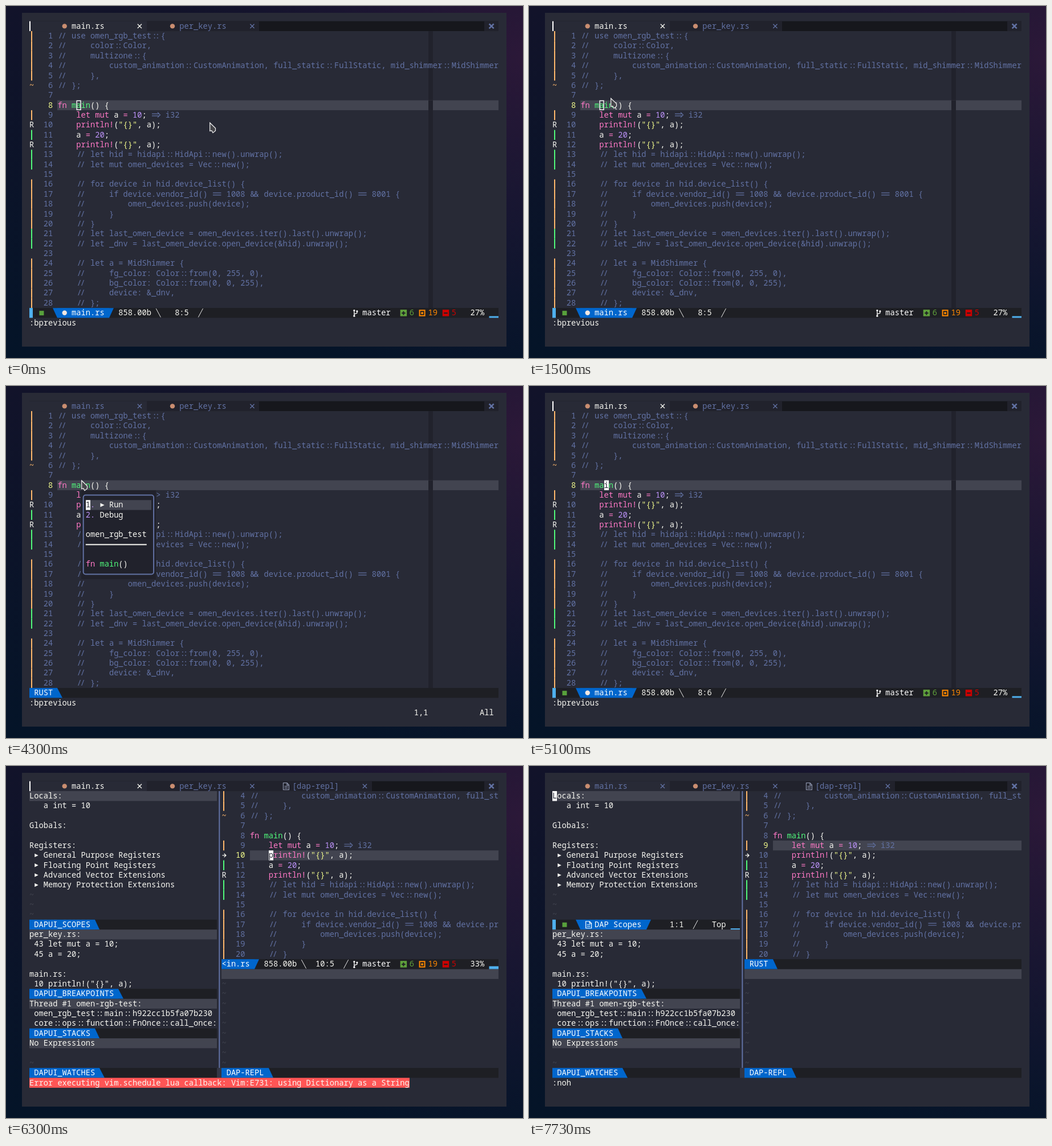
An HTML page with a canvas for the animation above (8 s loop, 907 px wide and 618 px high).

```html
<!DOCTYPE html>
<html lang="en">
<head>
<meta charset="utf-8">
<title>Editor debugging session</title>
<style>
html, body { margin: 0; width: 100%; height: 100%; overflow: hidden; background: #061226; }
canvas { display: block; width: 907px; height: 618px; }
</style>
</head>
<body>
<canvas id="stage" width="907" height="618"></canvas>
<script>
const ctx = document.getElementById('stage').getContext('2d');
const LOOP = 8000, CW = 8.23, CH = 17.36, X0 = 41, Y0 = 26.7;
const BG = '#282a36', DARK = '#21222c', BAR = '#1e1f24', LINE = '#424450', FG = '#f8f8f2',
  BLUE = '#6272a4', PINK = '#ff79c6', GREEN = '#50fa7b', PURPLE = '#bd93f9',
  YELLOW = '#f1fa8c', ORANGE = '#ffb86c', MODE = '#0066cc', SKY = '#4fb0ee', RUST = '#c98d70';

const CODE = `// use omen_rgb_test::{
//     color::Color,
//     multizone::{
//         custom_animation::CustomAnimation, full_static::FullStatic, mid_shimmer::MidShimmer
//     },
// };

fn main() {
    let mut a = 10; => i32
    println!("{}", a);
    a = 20;
    println!("{}", a);
    // let hid = hidapi::HidApi::new().unwrap();
    // let mut omen_devices = Vec::new();

    // for device in hid.device_list() {
    //     if device.vendor_id() == 1008 && device.product_id() == 8001 {
    //         omen_devices.push(device);
    //     }
    // }
    // let last_omen_device = omen_devices.iter().last().unwrap();
    // let _dnv = last_omen_device.open_device(&hid).unwrap();

    // let a = MidShimmer {
    //     fg_color: Color::from(0, 255, 0),
    //     bg_color: Color::from(0, 0, 255),
    //     device: &_dnv,
    // };`.split('\n');
// One sign per line: o/g = orange/green bar
const SIGNS = 'ooooo~  oRgRgg ooooogg ooooo';
const SCOPES = ['Locals:', '   a int = 10', '', 'Globals:', '', 'Registers:',
  '   General Purpose Registers', '   Floating Point Registers',
  '   Advanced Vector Extensions', '   Memory Protection Extensions'];
const BREAKS = ['per_key.rs:', ' 43 let mut a = 10;', ' 45 a = 20;', '', 'main.rs:', ' 10 println!("{}", a);'];
const STACKS = ['Thread #1 omen-rgb-test:', ' omen_rgb_test::main::h922cc1b5fa07b230',
  ' core::ops::function::FnOnce::call_once:'];
const ERROR = 'Error executing vim.schedule lua callback: Vim:E731: using Dictionary as a String';
const NUDGE = { '//': 1.1, '::': 1.5, '&&': 0.8 };

const cx = c => X0 + c * CW, cy = r => Y0 + r * CH;

function rect(x, y, w, h, color) {
  ctx.fillStyle = color;
  ctx.fillRect(x, y, w, h);
}
function cells(c, r, w, h, color) {
  const x = Math.round(cx(c));
  rect(x, cy(r), Math.round(cx(c + w)) - x, h * CH, color);
}
function poly(points, color) {
  ctx.beginPath();
  points.forEach(([x, y]) => ctx.lineTo(x, y));
  ctx.closePath();
  ctx.fillStyle = color;
  ctx.fill();
}
function stroke(color, width, ...paths) {
  ctx.strokeStyle = color;
  ctx.lineWidth = width;
  ctx.beginPath();
  for (const p of paths) p.forEach(([x, y], i) => i ? ctx.lineTo(x, y) : ctx.moveTo(x, y));
  ctx.stroke();
}
function dot(x, y, r, color) {
  ctx.beginPath();
  ctx.arc(x, y, r, 0, 7);
  ctx.fillStyle = color;
  ctx.fill();
}

// Grid text with coding ligatures
function put(c, r, text, color = FG) {
  const base = cy(r) + 13;
  ctx.fillStyle = color;
  for (let i = 0; i < text.length && c + i < 100; i++) {
    const x = cx(c + i), pair = text.substr(i, 2), n = NUDGE[pair];
    if (n) {
      ctx.fillText(pair[0], x + n, base);
      if (c + i < 99) ctx.fillText(pair[1], x + CW - n, base);
      i++;
    } else if (pair === '==' || pair === '=>') {
      const end = x + 2 * CW - (pair === '=>' ? 3.2 : 1), tip = x + 2 * CW - 1, m = base - 4.8;
      stroke(color, 1.2, [[x + 1, m - 1.8], [end, m - 1.8]], [[x + 1, m + 1.8], [end, m + 1.8]]);
      if (pair === '=>') stroke(color, 1.2, [[tip - 4.5, m - 4.5], [tip, m], [tip - 4.5, m + 4.5]]);
      i++;
    } else if (text[i] !== ' ') ctx.fillText(text[i], x, base);
  }
}

function putCode(c, r, line) {
  const re = /\/\/.*|=> i32|"[^"]*"|println!|\b(?:fn|let|mut)\b|\bmain\b|\d+|=|[^\s]/g;
  for (const m of line.matchAll(re)) {
    const s = m[0];
    const color = /^(\/\/|=>)/.test(s) ? BLUE : s[0] === '"' ? YELLOW
      : /^(fn|let|mut|println!|=)$/.test(s) ? PINK : s === 'main' ? GREEN : /^\d/.test(s) ? PURPLE : FG;
    put(c + m.index, r, s, color);
  }
}

function triangle(c, r, kind, color) {
  const l = Math.round(cx(c)), e = Math.round(cx(c + 1)), t = cy(r), b = cy(r + 1);
  const corners = { upLeft: [[l, t], [e, t], [l, b]], upRight: [[l, t], [e, t], [e, b]], lowLeft: [[l, t], [e, b], [l, b]] };
  poly(corners[kind], color);
}
function slash(c, r, forward) {
  const a = cy(r) + 1, b = cy(r + 1) - 1;
  stroke('#e8e8e8', 1, [[cx(c), forward ? b : a], [cx(c + 1), forward ? a : b]]);
}
function cross(c, color) {
  const x = cx(c + 0.5), y = cy(0.5), s = 3.6;
  stroke(color, 1.3, [[x - s, y - s], [x + s, y + s]], [[x + s, y - s], [x - s, y + s]]);
}
function fileIcon(c, r, color) {
  const x = cx(c) + 1, y = cy(r) + 3;
  stroke(color, 1.2, [[x, y], [x + 6.5, y], [x + 10, y + 3.5], [x + 10, y + 12], [x, y + 12], [x, y - 0.5]],
    [[x + 6.5, y], [x + 6.5, y + 4], [x + 10, y + 4]],
    [[x + 2, y + 6], [x + 8, y + 6]], [[x + 2, y + 9], [x + 8, y + 9]]);
}

function drawTabs(active, repl) {
  cells(0, 0, 100, 1, '#16171c');
  cells(0, 0, 25, 1, BG);
  cells(25, 0, 24, 1, DARK);
  cells(97, 0, 3, 1, DARK);
  if (active) cells(0, 0, 0.26, 1, '#fff');
  const fg = active ? FG : BLUE;
  dot(cx(7.5), cy(0.5), 4.2, RUST);
  put(9, 0, 'main.rs', fg);
  cross(23, fg);
  dot(cx(30.5), cy(0.5), 4.2, RUST);
  put(32, 0, 'per_key.rs', BLUE);
  cross(47, BLUE);
  if (repl) {
    cells(49, 0, 24, 1, DARK);
    fileIcon(54, 0, '#8a91a8');
    put(56, 0, '[dap-repl]', BLUE);
    cross(71, BLUE);
  }
  const x = cx(98.5), y = cy(0.5);
  stroke(BLUE, 2.6, [[x - 4, y - 4], [x + 4, y + 4]], [[x + 4, y - 4], [x - 4, y + 4]]);
}

// Lines from `first` on, in the window starting at column c
function drawCode(c, first, rows, cur, arrow) {
  if (c === 0) cells(85, 1, 1, rows, DARK);
  for (let i = 0; i < rows; i++) {
    const n = first + i, r = i + 1, sign = SIGNS[n - 1];
    if (n === cur) {
      cells(c + 6, r, 94 - c, 1, LINE);
      if (c === 0) cells(85, r, 1, 1, DARK);
    }
    if (arrow && n === 10) {
      const x = cx(c) + 1, y = cy(r + 0.5);
      stroke(FG, 1.3, [[x, y], [x + 6.5, y]], [[x + 3.2, y - 3.2], [x + 6.5, y], [x + 3.2, y + 3.2]]);
    } else if (sign === 'o' || sign === 'g') {
      rect(Math.floor(cx(c + 0.5)) - 1, cy(r), 2, CH, sign === 'o' ? ORANGE : GREEN);
    } else put(c, r, sign, sign === '~' ? ORANGE : FG);
    put(c + 3, r, String(n).padStart(2), n === cur ? YELLOW : BLUE);
    putCode(c + 6, r, CODE[n - 1]);
  }
}

function block(c, r, char) {
  cells(c, r, 1, 1, '#fff');
  put(c, r, char, BG);
}

function label(c, r, w, text) {
  cells(c, r, w, 1, BAR);
  cells(c, r, text.length + 2, 1, MODE);
  triangle(c + text.length + 2, r, 'lowLeft', MODE);
  put(c + 1, r, text, '#fff');
}

function modeBlock(r) {
  cells(0, r, 0.76, 1, SKY);
  rect(cx(2) + 1, cy(r) + 5, 8, 8, '#58a13c');
  triangle(5, r, 'upRight', MODE);
}

function badge(c, r, color, kind) {
  const x = cx(c) + 0.5, y = cy(r) + 4, m = x + 5.5, v = y + 5;
  if (kind === '~') {
    stroke(color, 2, [[x + 1, y], [x + 10, y], [x + 10, y + 9.5], [x + 1, y + 9.5], [x + 1, y - 1]]);
    rect(m - 1.8, v - 1.8, 3.6, 3.6, color);
    return;
  }
  rect(x, y - 1, 11.5, 11.5, color);
  rect(m - 3, v - 1, 6.5, 2, BAR);
  if (kind === '+') rect(m - 0.8, v - 3.2, 2, 6.5, BAR);
}

function gitInfo(r, percent) {
  const x = cx(69) + 2, y = cy(r) + 4;
  stroke('#fff', 1.3, [[x, y + 2], [x, y + 9]], [[x, y + 7], [x + 5, y + 5], [x + 5, y + 3]]);
  [[0, 0.5], [0, 10], [5, 1.8]].forEach(([a, b]) => dot(x + a, y + b, 1.6, '#fff'));
  put(71, r, 'master', '#fff');
  badge(79, r, '#5fa03c', '+');
  put(81, r, '6', '#5fa03c');
  badge(83, r, '#ff8800', '~');
  put(85, r, '19', '#ff8800');
  badge(88, r, '#cc0000', '-');
  put(90, r, '5', '#cc0000');
  put(94, r, percent + '%');
  const h = percent > 30 ? 5 : 3;
  rect(cx(98), cy(r + 1) - h, 2 * CW, h, SKY);
}

function fullStatus(pos) {
  cells(0, 29, 100, 1, BAR);
  modeBlock(29);
  cells(6, 29, 11, 1, MODE);
  triangle(17, 29, 'upLeft', MODE);
  dot(cx(7.5), cy(29.5), 4.2, '#f1e8e2');
  put(9, 29, 'main.rs', '#fff');
  put(19, 29, '858.00b');
  slash(27, 29, false);
  put(31, 29, pos);
  slash(36, 29, true);
  gitInfo(29, 27);
}

function splitStatus(pos, percent) {
  cells(41, 18, 59, 1, BAR);
  cells(41, 18, 7, 1, MODE);
  triangle(48, 18, 'upLeft', MODE);
  put(41, 18, '<in.rs', '#fff');
  put(50, 18, '858.00b');
  slash(58, 18, false);
  put(65 - pos.length, 18, pos);
  slash(67, 18, true);
  gitInfo(18, percent);
}

function scopeStatus() {
  cells(0, 14, 40, 1, BAR);
  modeBlock(14);
  cells(6, 14, 14, 1, MODE);
  triangle(20, 14, 'upLeft', MODE);
  fileIcon(7, 14, '#fff');
  put(9, 14, 'DAP Scopes', '#fff');
  put(25, 14, '1:1');
  slash(30, 14, true);
  put(34, 14, 'Top');
  rect(cx(38), cy(15) - 2, 2 * CW, 2, SKY);
}

const fillers = (c, from, to) => { for (let r = from; r <= to; r++) put(c, r, '~', LINE); };
const list = (r, lines) => lines.forEach((s, i) => put(0, r + i, s));

function drawPanels(stopped, focusScopes) {
  [1, 15, 22, 26].forEach(r => cells(0, r, 40, 1, LINE));
  if (stopped) {
    list(1, SCOPES);
    for (let r = 7; r <= 10; r++) {
      const x = cx(1) + 1, y = cy(r + 0.5);
      poly([[x, y - 3.2], [x + 6.5, y], [x, y + 3.2]], FG);
    }
    list(22, STACKS);
  } else fillers(0, 23, 24);
  fillers(0, stopped ? 11 : 2, 13);
  list(15, BREAKS);
  put(0, 26, 'No Expressions');
  fillers(0, 28, 28);
  if (focusScopes) scopeStatus();
  else label(0, 14, 40, 'DAPUI_SCOPES');
  label(0, 21, 40, 'DAPUI_BREAKPOINTS');
  label(0, 25, 40, 'DAPUI_STACKS');
  label(0, 29, 40, 'DAPUI_WATCHES');
  cells(40, 1, 1, 28, BG);
  rect(cx(40.5) - 1, cy(1), 2, 28 * CH, BLUE);
  cells(40, 29, 1, 1, '#343746');
  cells(41, 19, 59, 1, LINE);
  fillers(41, 20, 28);
  label(41, 29, 59, 'DAP-REPL');
}

function drawPopup(focused, choice) {
  cells(11, 9, 16, 9, DARK);
  ctx.strokeStyle = BLUE;
  ctx.lineWidth = 2;
  ctx.beginPath();
  ctx.roundRect(cx(11.5), cy(9.5), 15 * CW, 8 * CH, 4);
  ctx.stroke();
  cells(27, 9, 1, 1, BG);
  put(27, 9, '>', BLUE);
  cells(12, 9 + choice, 14, 1, LINE);
  put(12, 10, '1.', PURPLE);
  poly([[cx(15) + 1, cy(10.5) - 3.5], [cx(16), cy(10.5)], [cx(15) + 1, cy(10.5) + 3.5]], FG);
  put(17, 10, 'Run');
  put(12, 11, '2.', PURPLE);
  put(15, 11, 'Debug');
  put(12, 13, 'omen_rgb_test');
  rect(cx(12), cy(14.5) - 1, 13 * CW, 2, FG);
  putCode(12, 16, 'fn main()');
  if (focused) block(12, 9 + choice, String(choice));
}

// Pointer path: time, x, y
const PATH = [[0, 357, 204], [130, 357, 204], [230, 388, 225], [340, 369, 305], [450, 290, 347],
  [560, 215, 310], [670, 190, 238], [730, 168, 178], [800, 182, 125], [870, 205, 168],
  [1270, 205, 168], [1420, 150, 160], [1570, 132, 165], [8000, 132, 165]];
function pointer(t) {
  const i = PATH.findIndex(p => p[0] > t) - 1;
  const at = k => PATH[Math.max(0, Math.min(PATH.length - 1, k))];
  const [a, b, c, d] = [at(i - 1), at(i), at(i + 1), at(i + 2)];
  const u = (t - b[0]) / (c[0] - b[0]);
  return [1, 2].map(k => {
    if (b[k] === c[k]) return b[k];
    const v = (c[k] - a[k]) / 4, w = (d[k] - b[k]) / 4;
    return b[k] + v * u + (3 * (c[k] - b[k]) - 2 * v - w) * u * u + (2 * (b[k] - c[k]) + v + w) * u ** 3;
  });
}
function drawPointer(t) {
  const [x, y] = pointer(Math.floor(t / 33.4) * 33.4);
  ctx.save();
  ctx.translate(x, y);
  const shape = [[0.7, 1], [0.7, 15.5], [3.8, 14.6], [6, 18.6], [10.5, 15], [10.5, 10.5]];
  poly(shape, '#45454a');
  stroke('#f4f4f4', 1.2, [...shape, shape[0], shape[1]]);
  ctx.restore();
}

function drawDesktop() {
  const g = ctx.createLinearGradient(0, 0, 0, 618);
  g.addColorStop(0, '#12132a');
  g.addColorStop(1, '#041428');
  rect(0, 0, 907, 618, g);
  const glow = ctx.createRadialGradient(907, 90, 0, 907, 90, 620);
  glow.addColorStop(0, 'rgba(66,28,68,.55)');
  glow.addColorStop(0.5, 'rgba(46,26,64,.32)');
  glow.addColorStop(1, 'rgba(30,24,60,0)');
  rect(0, 0, 907, 618, glow);
  rect(28, 12, 850, 586, BG);
}

function drawEditor(t) {
  const popup = t >= 3570 && t < 5070, inPopup = t >= 4270 && t < 5070;
  drawTabs(!inPopup, false);
  drawCode(0, 1, 28, 8, false);
  if (inPopup) {
    label(0, 29, 100, 'RUST');
    put(82, 31, (t < 4700 ? 1 : 2) + ',1');
    put(96, 31, 'All');
  } else fullStatus(t < 1600 ? '8:5' : '8:6');
  put(0, 30, ':bprevious');
  if (t < 1600) {
    ctx.strokeStyle = '#fff';
    ctx.lineWidth = 1.4;
    ctx.strokeRect(cx(10) + 0.9, cy(8) + 0.7, CW - 1.4, CH - 1.4);
  } else {
    const off = (t >= 2130 && t < 2600) || (t >= 3100 && t < 3400) || (t >= 4100 && t < 5070);
    if (!off) block(11, 8, 'i');
  }
  if (popup) drawPopup(inPopup, t < 4700 ? 1 : 2);
  if (t < 4670) drawPointer(t);
}

function drawDebugger(t) {
  const stopped = t >= 5630, scopes = (t >= 7100 && t < 7530) || t >= 7700;
  const cur = !stopped ? 8 : t < 6730 ? 10 : 9;
  drawTabs(!scopes, true);
  drawCode(41, 4, 17, cur, stopped);
  drawPanels(stopped, scopes);
  if (scopes) {
    label(41, 18, 59, 'RUST');
    block(0, 1, 'L');
  } else {
    splitStatus(cur + (stopped ? ':5' : ':6'), { 8: 27, 9: 30, 10: 33 }[cur]);
    if (!stopped) block(52, 5, 'i');
    else if (t >= 6300) block(51, cur - 3, cur === 10 ? 'p' : 'l');
  }
  if (t < 6500) {
    cells(0, 30, ERROR.length, 1, '#ff5555');
    put(0, 30, ERROR);
  } else put(0, 30, ':noh');
  if (t >= 7670 && t < 7700) put(89, 31, '^W');
}

function frame(now) {
  const t = now % LOOP;
  ctx.font = '500 13.72px "Noto Sans Mono", "DejaVu Sans Mono", monospace';
  drawDesktop();
  if (t < 5470) drawEditor(t);
  else drawDebugger(t);
  requestAnimationFrame(frame);
}
requestAnimationFrame(frame);
</script>
</body>
</html>
```
